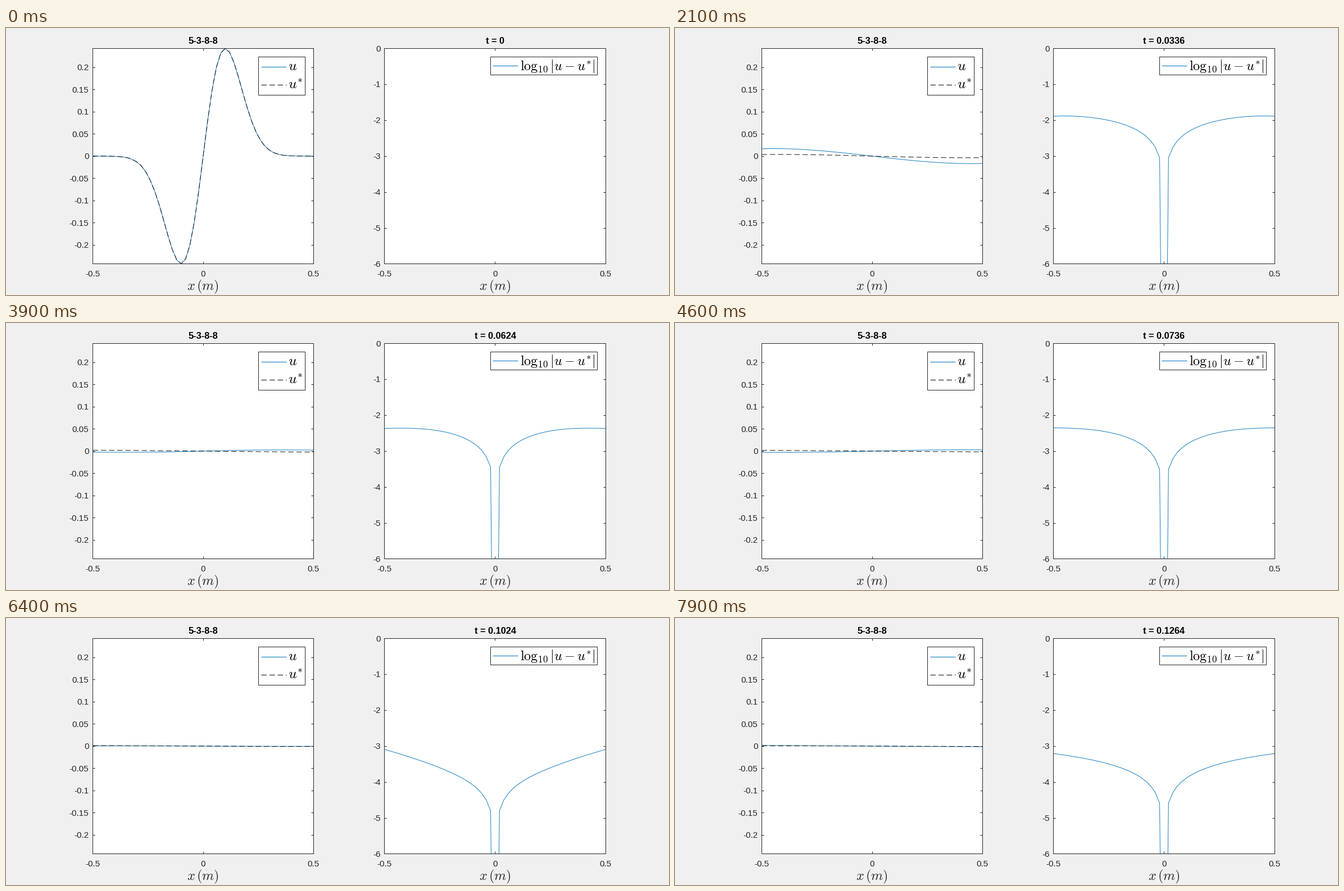
Animation of 1180x475 px, one loop 8 s. Source, as a matplotlib script:

```python
import matplotlib.pyplot as plt
import numpy as np
from matplotlib.animation import FuncAnimation
from matplotlib.patches import Rectangle

W, H, DPI = 1180, 475, 100
PX = 72 / DPI  # points per pixel
FRAMES, INTERVAL = 80, 100
DT = 0.0016
INK, BLUE = "#262626", "#0072BD"
DASH = (0, (9.5, 5))
YMAX = 0.2426

# Just under half a pixel, so that snapped strokes land on the named pixel
MID = 0.4
TOP, BOTTOM = 36 + MID, 419 + MID
WAVE_X, WAVE_W = 154 + MID, 393
LOG_X, LOG_W = 673 + MID, 394

plt.rcParams["font.family"] = "Liberation Sans"
plt.rcParams["mathtext.fontset"] = "cm"

x = np.arange(-25, 26) * 0.02

# Odd polynomial coefficients (s, s^3, s^5 with s = 2x) of the boundary error
KEY_T = np.array([0, 0.016, 0.0336, 0.0624, 0.0848, 0.1024, 0.1264])
KEY_C = np.array([
    [0, 0, 0],
    [0.0122, -0.0503, 0.0227],
    [-0.0223, 0.0100, -0.0006],
    [0.0088, -0.0066, 0.0021],
    [0.0036, -0.0008, 0],
    [0.000395, 0.000415, 0],
    [-0.00064, 0.00002, 0],
])
SLOPE = np.gradient(KEY_C, KEY_T, axis=0)
SLOPE[0] = 0


def beam(pos, t):
    """Bending wave on an infinite beam, released from 4x exp(-50x^2)."""
    q = 1 + 1050j * t
    return (4 * pos * q ** -1.5 * np.exp(-50 * pos ** 2 / q)).real


def coefficients(t):
    """Cubic Hermite interpolation between the key shapes."""
    i = min(np.searchsorted(KEY_T, t, side="right") - 1, len(KEY_T) - 2)
    h = KEY_T[i + 1] - KEY_T[i]
    v = (t - KEY_T[i]) / h
    rise = v * v * (3 - 2 * v)
    return (KEY_C[i] * (1 - rise) + KEY_C[i + 1] * rise
            + h * v * (1 - v) * (SLOPE[i] * (1 - v) - SLOPE[i + 1] * v))


def error(t):
    s = 2 * x
    a, b, c = coefficients(t)
    echo = 0.2 * max(0, 1 - t / 0.016) ** 2
    reflected = beam(1 - x, t) - beam(1 + x, t)
    return a * s + b * s ** 3 + c * s ** 5 + echo * reflected


fig = plt.figure(figsize=(W / DPI, H / DPI), dpi=DPI, facecolor="#F0F0F0")


def make_panel(left, width, ylim, yticks):
    ax = fig.add_axes([left / W, 1 - BOTTOM / H,
                       width / W, (BOTTOM - TOP) / H])
    ax.set(xlim=(-0.5, 0.5), ylim=ylim, xticks=[-0.5, 0, 0.5], yticks=yticks)
    ax.tick_params(direction="in", length=4 * PX, width=PX, color=INK,
                   top=True, right=True, labelbottom=False, labelleft=False)
    for spine in ax.spines.values():
        spine.set(color=INK, linewidth=PX)
    return ax


wave_ticks = np.arange(-4, 5) * 0.05
log_ticks = np.arange(-6, 1)
wave_ax = make_panel(WAVE_X, WAVE_W, (-YMAX, YMAX), wave_ticks)
log_ax = make_panel(LOG_X, LOG_W, (-6, 0), log_ticks)

# Overlay in pixel coordinates, y pointing down
page = fig.add_axes([0, 0, 1, 1], zorder=5)
page.set(xlim=(0, W), ylim=(H, 0))
page.axis("off")


def label(px, py, text, size, ha="center", **style):
    style.setdefault("color", INK)
    return page.text(px, py, text, fontsize=size * PX, ha=ha,
                     va="baseline", **style)


def legend_box(left, top, width, height):
    page.add_patch(Rectangle((left + MID, top + MID), width, height,
                             facecolor="white", edgecolor=INK, linewidth=PX))


def sample(left, right, py, **style):
    page.plot([left, right], [py + MID, py + MID], linewidth=PX,
              solid_capstyle="butt", **style)


def label_axes(left, width, ylim, yticks):
    for tick in (-0.5, 0, 0.5):
        label(left + (tick + 0.5) * width, 441.5, f"{tick:g}", 15.2)
    for tick in yticks:
        drop = (ylim[1] - tick) / (ylim[1] - ylim[0])
        label(left - 7, TOP + (BOTTOM - TOP) * drop + 5.2,
              f"{round(tick, 2):g}", 15.2, ha="right")
    label(left + width / 2 - 0.5, 466, r"$x\,(m)$", 24)


label_axes(WAVE_X, WAVE_W, (-YMAX, YMAX), wave_ticks)
label_axes(LOG_X, LOG_W, (-6, 0), log_ticks)

label(350.5, 28, "5-3-8-8", 16.4, weight="bold", color="black")
clock = label(870.5, 28, "", 16.4, weight="bold", color="black")

legend_box(449, 51, 83, 68)
sample(454, 499, 69, color=BLUE)
sample(454, 499, 101, color="black", linestyle=DASH)
label(501.5, 75, "$u$", 25.5, ha="left", color="black")
label(501.5, 108.5, "$u^{*}$", 25.5, ha="left", color="black")

legend_box(862, 51, 190, 32)
sample(866, 911, 67, color=BLUE)
label(915, 74, r"$\mathrm{log}_{10}\,|u-u^{*}|$", 24.2, ha="left",
      color="black")

CURVE = 0.9  # curve width in pixels
u_line, = wave_ax.plot([], [], color=BLUE, linewidth=CURVE * PX)
exact_line, = wave_ax.plot([], [], color="black", linewidth=CURVE * PX,
                           linestyle=(0, [d / CURVE for d in DASH[1]]))
log_line, = log_ax.plot([], [], color=BLUE, linewidth=CURVE * PX)


def draw(frame):
    t = frame * DT
    exact = beam(x, t)
    err = error(t) if frame else np.zeros_like(x)
    u_line.set_data(x, exact + err)
    exact_line.set_data(x, exact)
    if frame:
        log_line.set_data(x, np.log10(np.maximum(np.abs(err), 1e-16)))
    else:
        log_line.set_data([], [])
    clock.set_text(f"t = {t:.4g}")
    return u_line, exact_line, log_line, clock


anim = FuncAnimation(fig, draw, frames=FRAMES, interval=INTERVAL,
                     repeat=True, repeat_delay=0)
plt.show()
```
